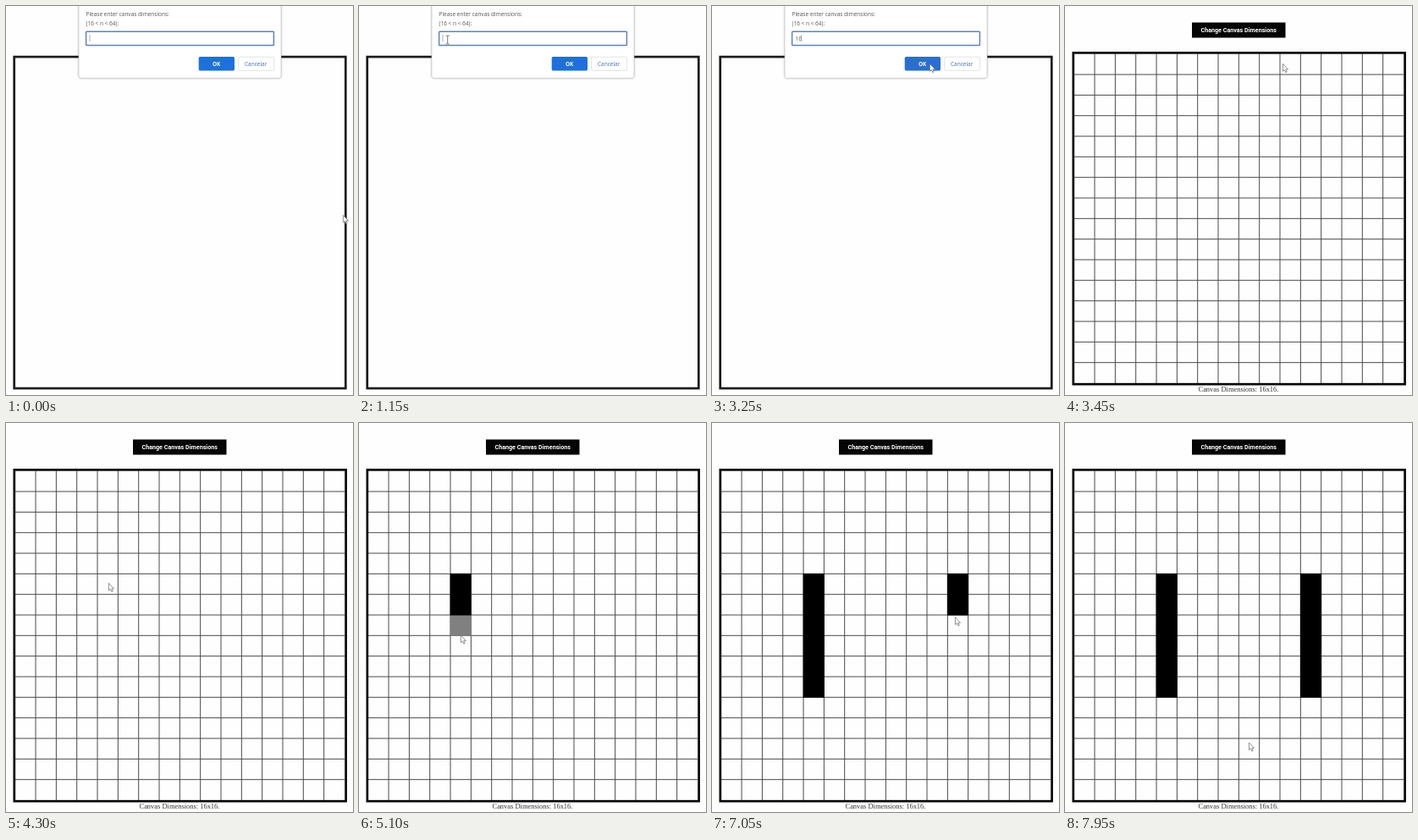
An HTML page for the animation above (8000 ms loop, 410 by 460 pixels).

```html
<!DOCTYPE html>
<html lang="en">
<head>
<meta charset="utf-8">
<title>Canvas grid</title>
<style>
  html, body { margin: 0; width: 100%; height: 100%; overflow: hidden; background: #fefefe; }
  svg { display: block; }
  .ui { font-family: "Open Sans", sans-serif; font-size: 6.5px; fill: #555; }
  .mid { text-anchor: middle; }
  .frame { fill: none; stroke: #1c1c1c; stroke-width: 2.7; }
  #dialog { filter: drop-shadow(0 .8px 1.3px #0004); }
</style>
</head>
<body>
<svg width="410" height="460">
  <g id="promptScene">
    <rect class="frame" x="9.7" y="60.1" width="391.6" height="392"/>
    <rect id="dialog" x="86" y="-10" width="239" height="95.3" rx="2.5" fill="#fff" stroke="#cacaca" stroke-width=".7"/>
    <g class="ui">
      <text x="94.5" y="12">Please enter canvas dimensions:</text>
      <text x="94.5" y="23">(16 &lt; n &lt; 64):</text>
      <rect x="94.6" y="30.2" width="221.8" height="16.4" rx=".8" fill="#fff" stroke="#5f82bf" stroke-width="1.5"/>
      <text id="entry" x="98.5" y="40.8"></text>
      <path id="caret" d="M0 34v8" stroke="#999" stroke-width=".8"/>
      <rect id="ok" x="227.7" y="60" width="42.3" height="16.6" rx="1.8"/>
      <text class="mid" x="248.7" y="70.7" style="fill:#fff;font-weight:700;font-size:6.4px">OK</text>
      <rect x="274.6" y="60.3" width="42" height="16" rx="1.8" fill="#fff" stroke="#d9dce2" stroke-width=".8"/>
      <text class="mid" x="295.2" y="70.5" style="fill:#4670b8">Cancelar</text>
    </g>
  </g>
  <g id="gridScene">
    <rect x="150" y="19.5" width="110.5" height="18" fill="#050505"/>
    <text class="mid" x="205.2" y="31.2" fill="#fff" font-family="Roboto, sans-serif" font-weight="700" font-size="7.15">Change Canvas Dimensions</text>
    <path id="lines" stroke="#4a4a4a" fill="none"/>
    <path id="half" fill="#808080"/>
    <path id="full"/>
    <rect class="frame" x="9.8" y="55.4" width="391.8" height="391.8" style="stroke:#080808"/>
    <text x="157.5" y="456.3" fill="#333" font-family="Liberation Serif, serif" font-size="8.45">Canvas Dimensions: 16x16.</text>
    <rect y="457" width="410" height="3" fill="#fefefe"/>
  </g>
  <path id="arrow" d="M.4.4V9.2L2.4 7.4 3.8 10.6 5.2 10 3.9 6.9H6.5Z" fill="#fff" stroke="#777" stroke-width=".8"/>
  <path id="beam" d="M-2-5Q0-5 0-4Q0-5 2-5M0-4V4M-2 5Q0 5 0 4Q0 5 2 5" fill="none" stroke="#555" stroke-width=".8"/>
</svg>
<script>
const LOOP = 8000, STEP = 50, GRID_AT = 3400;
const LEFT = 10.7, TOP = 56.7, CELL = 24.33, COUNT = 16;
const FIRST_ROW = 5, STROKE_ROWS = 6;
const $ = id => document.getElementById(id);
const show = (el, on) => el.style.display = on ? '' : 'none';
const set = (id, name, value) => $(id).setAttribute(name, value);

// Eased pointer moves; a column means the move paints cells down it
const home = { x: 398, y: 247 };
const moves = [
  { from: 0, to: 850, x: 108, y: 42 },
  { from: 1100, to: 1150, x: 104.7, y: 40 },
  { from: 2550, to: 3250, x: 257, y: 68 },
  { from: 3450, to: 4200, x: 121, y: 189 },
  { from: 4600, to: 5550, x: 119, y: 303, column: 4 },
  { from: 5700, to: 6150, x: 311, y: 202.5 },
  { from: 6250, to: 6700, x: 287, y: 186 },
  { from: 6800, to: 7400, x: 287, y: 301, column: 11 },
  { from: 7550, to: 7950, x: 217, y: 377.5 }
];

let grid = '';
for (let i = 1; i < COUNT; i++) {
  const span = CELL * COUNT, offset = i * CELL;
  grid += `M${LEFT + offset} ${TOP}v${span}M${LEFT} ${TOP + offset}h${span}`;
}
set('lines', 'd', grid);

function pointer(t) {
  let { x, y } = home;
  for (const m of moves) {
    const k = Math.min(1, Math.max(0, (t - m.from) / (m.to - m.from)));
    const ease = k * k * (3 - 2 * k);
    x += (m.x - x) * ease;
    y += (m.y - y) * ease;
  }
  return { x, y };
}

// Cells fill evenly over a stroke, each passing briefly through grey
function paint(t) {
  let full = '', half = '';
  for (const { from, to, column } of moves.filter(m => m.column)) {
    for (let i = 0; i < STROKE_ROWS; i++) {
      const age = t - from - (to - from) * (i + 1) / STROKE_ROWS;
      const size = CELL + .8;
      const cell = `M${LEFT + column * CELL - .4} ${TOP + (FIRST_ROW + i) * CELL - .4}h${size}v${size}h${-size}z`;
      if (age >= STEP) full += cell;
      else if (age >= 0) half += cell;
    }
  }
  set('full', 'd', full);
  set('half', 'd', half);
}

function draw(t) {
  const prompting = t < GRID_AT;
  show($('promptScene'), prompting);
  show($('gridScene'), !prompting);

  const typed = (t >= 1650) + (t >= 2050);
  $('entry').textContent = '16'.slice(0, typed);
  set('caret', 'transform', `translate(${99 + typed * 3.4})`);
  show($('caret'), typed || Math.floor((t + 50) / 500) % 2 === 0);
  paint(t);

  const { x, y } = pointer(t);
  const overInput = prompting && x > 95 && x < 316 && y > 30 && y < 47;
  const overOk = x > 228 && x < 270 && y > 60 && y < 77;
  set('ok', 'fill', overOk ? '#2a6fd0' : '#1f70da');
  for (const id of ['arrow', 'beam']) set(id, 'transform', `translate(${x} ${y})`);
  show($('arrow'), !overInput);
  show($('beam'), overInput);
}

function tick() {
  draw(Math.floor(performance.now() % LOOP / STEP) * STEP);
  requestAnimationFrame(tick);
}
tick();
</script>
</body>
</html>
```
